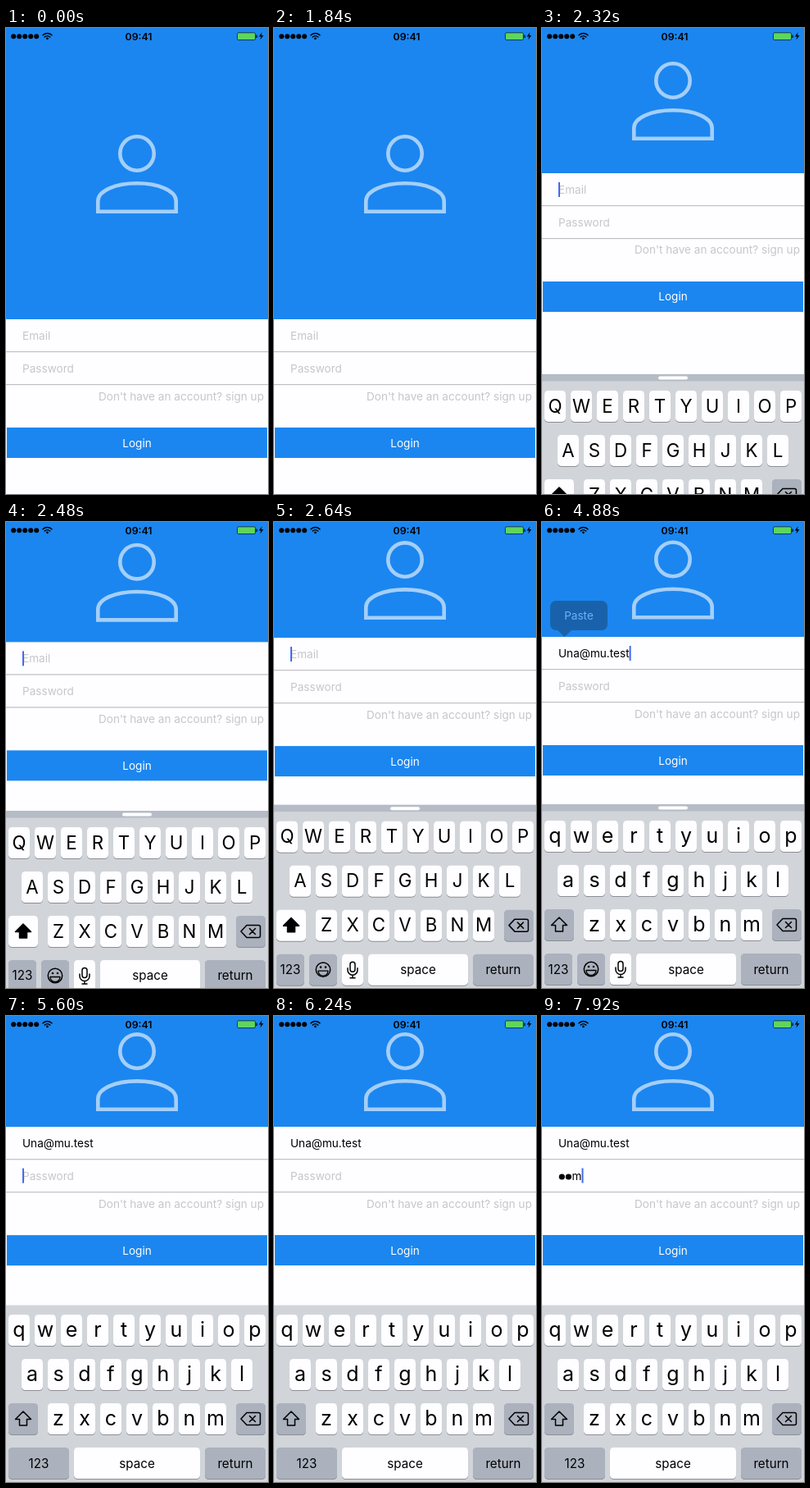
An HTML page that plays this animation: 320x568 px, repeating every 8000 ms.

```html
<!DOCTYPE html>
<html lang="en">
<head>
<meta charset="utf-8">
<title>Login form</title>
<style>
  html, body { margin: 0; width: 100%; height: 100%; overflow: hidden; background: #fefdff; }
  svg { display: block; width: 100%; height: 100%; }
  text { font: 13.6px Inter, "Liberation Sans", sans-serif; }
  .mid { text-anchor: middle; }
  .hint { fill: #c6c6cb; }
  .icon { fill: none; stroke: #a4cff9; stroke-width: 4.6; }
  .key { fill: #fefdff; }
  .grey { fill: #abb1bd; }
  .edge { fill: #8b8e94; }
  .small { font-size: 15.2px; }
  .letter { font-size: 25px; }
  .upper .letter { font-size: 22.3px; }
  .line { fill: none; stroke: #000; stroke-width: 1.5; stroke-linejoin: round; stroke-linecap: round; }
  .upper #shiftKey { fill: #fefdff; }
  .upper #shiftArrow { fill: #000; }
</style>
</head>
<body>
<svg viewBox="0 0 320 568" preserveAspectRatio="none">
  <defs>
    <clipPath id="lens"><circle cx="197" cy="98" r="56"/></clipPath>
    <radialGradient id="shade" cx=".5" cy=".62" r=".63">
      <stop offset=".5" stop-opacity="0"/>
      <stop offset=".8" stop-opacity=".07"/>
      <stop offset="1" stop-opacity=".3"/>
    </radialGradient>
    <filter id="soft" x="-20%" y="-20%" width="140%" height="140%"><feGaussianBlur stdDeviation="2"/></filter>
  </defs>

  <g id="scene">
    <rect width="320" height="568" fill="#fefdff"/>
    <rect id="banner" width="320" fill="#1b86f0"/>
    <g id="avatar" class="icon">
      <circle cx="160" cy="153" r="20.7"/>
      <path d="M112.3 223.7V211C112.3 198 134 189.3 160 189.3S207.7 198 207.7 211V223.7Z"/>
    </g>
    <g id="form">
      <text id="email" x="20" y="25"></text>
      <rect y="39" width="320" height="1.2" fill="#c0bfc4"/>
      <g id="dots"><circle cx="24.3" cy="61" r="3.6"/><circle cx="32.4" cy="61" r="3.6"/></g>
      <text id="password" y="65"></text>
      <rect y="79" width="320" height="1.2" fill="#c0bfc4"/>
      <text class="hint" x="315" y="98.5" text-anchor="end">Don't have an account? sign up</text>
      <rect x="1" y="132" width="318" height="37" fill="#1b86f0"/>
      <text class="mid" x="160" y="155.5" fill="#fff">Login</text>
      <rect id="caret" width="2" height="18" fill="#426bf2"/>
    </g>
  </g>

  <g id="status">
    <g id="signal"></g>
    <path class="line" stroke-width="1.8" d="M45 8.7a7.8 7.8 0 0 1 11 0M47.2 11a4.7 4.7 0 0 1 6.6 0"/>
    <circle cx="50.5" cy="12.8" r="1.4"/>
    <text class="mid" x="162" y="14.6" style="font-size:12.3px;font-weight:600">09:41</text>
    <rect x="282.5" y="5.8" width="22" height="8.8" rx="1.5" fill="#5fd65b" stroke="#153a50"/>
    <path d="M305.5 8.5h1.2v3.4h-1.2zM312.6 5.2l-3.8 5.4h2.6l-.9 3.8 3.9-5.5h-2.6z"/>
  </g>

  <g id="bubble">
    <path d="M17 96H73a7 7 0 0 1 7 7V125a7 7 0 0 1-7 7H36L27.5 140 19 132H17a7 7 0 0 1-7-7V103a7 7 0 0 1 7-7Z" fill="#16202c"/>
    <text class="mid" x="45" y="119" fill="#fff">Paste</text>
  </g>

  <g id="keyboard">
    <g id="bar">
      <rect y="344" width="320" height="12" fill="#b5bcc6"/>
      <rect x="142" y="346.5" width="36" height="4" rx="2" fill="#fff"/>
    </g>
    <rect y="352.5" width="320" height="216" fill="#d1d5da"/>
    <g id="keys"></g>
    <path id="shiftArrow" class="line" d="M21 482l-9.5 9.5h5v7.5h9v-7.5h5z"/>
    <path class="line" d="M294 483.5h14.500a2 2 0 0 1 2 2v11a2 2 0 0 1-2 2H294L287 491zM297.500 487.500l7 7m0-7l-7 7"/>
    <g id="plainRow">
      <g class="line">
        <circle cx="60" cy="545" r="8.700"/>
        <path d="M54 546.500h12a6 6 0 0 1-12 0z" stroke-width="1.300"/>
        <rect x="93" y="535.500" width="6" height="12" rx="3"/>
        <path d="M90 543v2.500a6 6 0 0 0 12 0V543M96 551.500v3.500m-3 0h6"/>
      </g>
      <circle cx="57" cy="542" r="1.300"/><circle cx="63" cy="542" r="1.300"/>
    </g>
    <g id="secureRow"></g>
  </g>

  <g id="loupe">
    <circle cx="197" cy="100" r="57" opacity=".45" filter="url(#soft)"/>
    <g clip-path="url(#lens)">
      <use href="#scene" transform="translate(197 98) scale(1.2) translate(-199 -161)"/>
    </g>
    <circle cx="197" cy="98" r="56.500" fill="url(#shade)" stroke="#b9bcc2"/>
  </g>
</svg>

<script>
const $ = id => document.getElementById(id);
const set = (id, attrs) => {
  for (const name in attrs) $(id).setAttribute(name, attrs[name]);
};
const LOOP = 8000, STEP = 80;
const ADDRESS = "Una@mu.test";
const TYPED = [[6800, "k"], [7280, "e"], [7760, "m"]];

const key = (x, y, w, label = "", kind = "key", id = "", font = "small") =>
  `<rect class="edge" x="${x}" y="${y + 1}" width="${w}" height="38" rx="4.500"/>
   <rect class="${kind}" id="${id}" x="${x}" y="${y}" width="${w}" height="38" rx="4.500"/>
   <text class="mid ${font}" x="${x + w / 2}" y="${y + (font === "small" ? 24.500 : 26.800)}">${label}</text>`;

function buildKeyboard() {
  const rows = [["qwertyuiop", 3, 364], ["asdfghjkl", 19, 418], ["zxcvbnm", 51, 472]];
  $("keys").innerHTML = rows.map(([letters, x, y]) =>
    [...letters].map((c, i) => key(x + 32 * i, y, 26, c, "key", "", "letter")).join("")
  ).join("") + key(3, 472, 36, "", "grey", "shiftKey") + key(281, 472, 36, "", "grey")
    + key(243, 526, 74, "return", "grey");
  $("plainRow").insertAdjacentHTML("afterbegin",
    key(3, 526, 34, "123", "grey") + key(43, 526, 34, "", "grey")
    + key(83, 526, 26) + key(115, 526, 122, "space"));
  $("secureRow").innerHTML = '<rect y="524" width="241" height="44" fill="#d1d5da"/>'
    + key(3, 526, 74, "123", "grey") + key(83, 526, 154, "space");
  document.querySelectorAll("[id='']").forEach(el => el.removeAttribute("id"));
  $("signal").innerHTML = [0, 1, 2, 3, 4]
    .map(i => `<circle cx="${9.200 + 7 * i}" cy="10.200" r="3"/>`).join("");
}

// Linear interpolation through [time, value] points.
function track(t, points) {
  const next = points.findIndex(p => p[0] > t);
  if (next === 0) return points[0][1];
  if (next < 0) return points[points.length - 1][1];
  const [t0, v0] = points[next - 1], [t1, v1] = points[next];
  return v0 + (v1 - v0) * (t - t0) / (t1 - t0);
}
const decay = (t, start, rate) => Math.exp(-rate * Math.max(0, t - start) / 1000);
const spring = (t, start, rate) => {
  const x = rate * Math.max(0, t - start) / 1000;
  return (1 + x) * Math.exp(-x);
};

const CARET = [[2230, 0], [2240, 1], [3080, 1], [3280, 0], [3480, 0], [3680, 1],
  [4080, 1], [4280, 0], [4480, 0], [4720, 1], [6040, 1], [6240, 0], [6480, 0], [6640, 1]];
const BUBBLE = [[4320, 0], [4560, 1], [4820, 1], [4880, .35], [4960, .1], [5040, 0]];
const LOUPE = [[3540, 0], [3680, 1], [4160, 1], [4340, 0]];

function field(id, text, hint) {
  $(id).textContent = text || hint;
  $(id).setAttribute("class", text ? "" : "hint");
  return text ? $(id).getComputedTextLength() : 0;
}

function drawForm(t) {
  const top = t < 5200 ? 140 + 215 * decay(t, 2160, 11) : 135 + 5 * decay(t, 5200, 9);
  set("banner", { height: top });
  set("avatar", { transform: `translate(0 ${(top - 355) / 2})` });
  set("form", { transform: `translate(0 ${top})` });

  const emailWidth = field("email", t >= 4880 ? ADDRESS : "", "Email");
  const typed = TYPED.filter(([at]) => at <= t);
  const last = typed[typed.length - 1];
  const hidden = Math.max(0, typed.length - 1);
  [...$("dots").children].forEach((dot, i) => dot.setAttribute("opacity", i < hidden ? 1 : 0));
  const passwordX = 20 + 8.300 * hidden;
  set("password", { x: passwordX });
  const passwordWidth = field("password", last ? last[1] : "", "Password");

  const onPassword = t >= 5200;
  set("caret", {
    x: onPassword ? passwordX + passwordWidth : 20 + emailWidth,
    y: onPassword ? 50.500 : 11,
    opacity: last && t < last[0] + 160 ? 0 : track(t, CARET)
  });
}

function drawKeyboard(t) {
  const upper = t < 4880;
  set("keyboard", {
    transform: `translate(0 ${224 * spring(t, 2198, 18.260)})`,
    class: upper ? "upper" : ""
  });
  document.querySelectorAll(".letter").forEach(el => {
    el.textContent = upper ? el.textContent.toUpperCase() : el.textContent.toLowerCase();
  });
  set("bar", { transform: `translate(0 ${12 * (1 - spring(t, 5180, 18.260))})` });
  set("secureRow", { opacity: track(t, [[5180, 0], [5440, 1]]) });
}

function drawOverlays(t) {
  const size = track(t, LOUPE);
  set("loupe", {
    transform: `translate(199 161) scale(${size}) translate(-199 -161)`,
    visibility: size > 0 ? "visible" : "hidden"
  });
  set("bubble", { opacity: track(t, BUBBLE) });
}

function frame() {
  const t = Math.floor((performance.now() + 12) % LOOP / STEP) * STEP;
  drawForm(t);
  drawKeyboard(t);
  drawOverlays(t);
  requestAnimationFrame(frame);
}
buildKeyboard();
frame();
</script>
</body>
</html>
```
